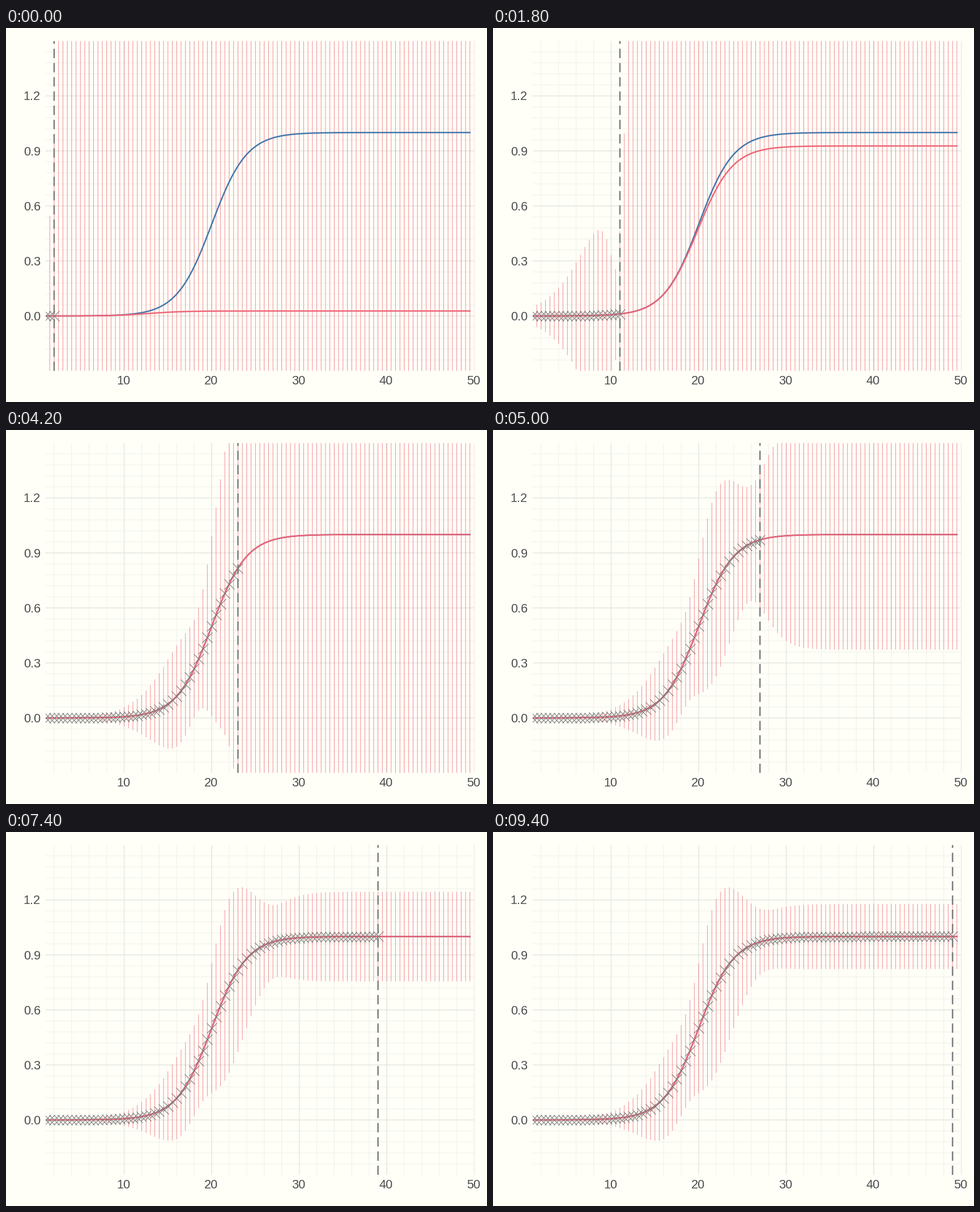
A matplotlib script for the animation above (9.6 s loop, 849x660 px).

```python
import numpy as np
import matplotlib.pyplot as plt
from matplotlib.animation import FuncAnimation
from matplotlib.collections import LineCollection

plt.rcParams["path.snap"] = False

W, H, DPI = 849, 660, 64
PX = 72 / DPI  # points per pixel
LEFT, RIGHT, TOP, BOTTOM = 69.5, 826.6, 22.6, 605.3
PAPER, BLUE, RED = "#fffff8", "#4477aa", "#ee6677"
GREY, INK = "#7c7c7a", "#4d4d4d"
FRAMES, STEP = 48, 200
GROWTH, MIDDLE = 0.5, 20

xs = np.arange(1, 50, 0.5)
fine = np.linspace(1, 49.5, 400)


def sigmoid(z):
    return 1 / (1 + np.exp(-z))


def curve(x, cap=1.0):
    """Logistic growth; a lower cap is reached earlier on the same initial rise."""
    return cap * sigmoid(GROWTH * (x - MIDDLE) - np.log(cap))


def capacity(cut):
    """Estimated cap, settled once enough points are known."""
    return 1.0 if cut >= 14 else sigmoid(0.68 * (cut - 7.265))


def half_width(x, cut):
    """Interval half width: uncertain rise and uncertain plateau combined."""
    y = curve(x)
    excess = np.exp(-0.46 * (cut - 20.2))
    # the best known point follows the cutoff, then settles below the middle
    lead = cut - 0.35 - 5.6 / cut**2
    best = 18.75 - 2 * np.log1p(np.exp((18.75 - lead) / 2))
    rise = y * (1 - y) * np.hypot(1.16 + 0.4 * excess, (0.65 + excess) * (x - best))
    unseen = 22 * min(1, np.exp(-1.2 * (cut - 23)))
    settled = 6.475 / max(cut - 12.5, 1)
    plateau = (unseen + settled) * sigmoid(0.75 * (x - 26.9))
    return np.hypot(rise, plateau)


fig = plt.figure(figsize=(W / DPI, H / DPI), dpi=DPI, facecolor=PAPER)
ax = fig.add_axes([LEFT / W, 1 - BOTTOM / H, (RIGHT - LEFT) / W, (BOTTOM - TOP) / H])
ax.set_xlim(1, 50)
ax.set_ylim(-0.3, 1.5)
ax.axis("off")


def grid(draw, values, major):
    for v in values:
        color, lw = ("#e7e7e2", 1.4) if major else ("#f0f0ea", 1.0)
        draw(v, color=color, lw=lw * PX, zorder=1 if major else 0)


grid(ax.axvline, range(2, 50, 2), False)
grid(ax.axhline, np.arange(-4, 25) * 0.06, False)
grid(ax.axvline, range(10, 51, 10), True)
grid(ax.axhline, np.arange(5) * 0.3, True)


def label(x, y, text, align):
    fig.text(x / W, 1 - y / H, text, ha=align, va="baseline", color=INK,
             family="Liberation Sans", size=21.8 * PX)


for v in range(10, 51, 10):
    label(LEFT + (v - 1) * (RIGHT - LEFT) / 49 - 1, 629, str(v), "center")
for n in range(5):
    v = n * 0.3
    label(61, BOTTOM - (v + 0.3) * (BOTTOM - TOP) / 1.8 + 7.7, f"{v:.1f}", "right")

bars = LineCollection([], colors=RED, linewidths=0.9 * PX, alpha=0.82, zorder=2)
ax.add_collection(bars, autolim=False)
ax.plot(fine, curve(fine), color=BLUE, lw=2.5 * PX, zorder=3)
fit, = ax.plot([], [], color=RED, lw=2.5 * PX, zorder=4)
points, = ax.plot([], [], "x", color=GREY, ms=18 * PX, mew=1.1 * PX, zorder=5)
cutoff, = ax.plot([], [], color=GREY, lw=2.5 * PX, zorder=6,
                  dashes=(6.6, 3.44), dash_capstyle="butt")


def update(i):
    cut = i + 2
    cap = capacity(cut)
    mid, half = curve(xs, cap), half_width(xs, cut)
    bars.set_segments([[(x, m - h), (x, m + h)] for x, m, h in zip(xs, mid, half)])
    fit.set_data(fine, curve(fine, cap))
    seen = xs[xs <= cut]
    points.set_data(seen, curve(seen))
    cutoff.set_data([cut, cut], [-0.3, 1.5])
    return bars, fit, points, cutoff


anim = FuncAnimation(fig, update, frames=FRAMES, interval=STEP, repeat=True,
                     repeat_delay=0)
plt.show()
```
